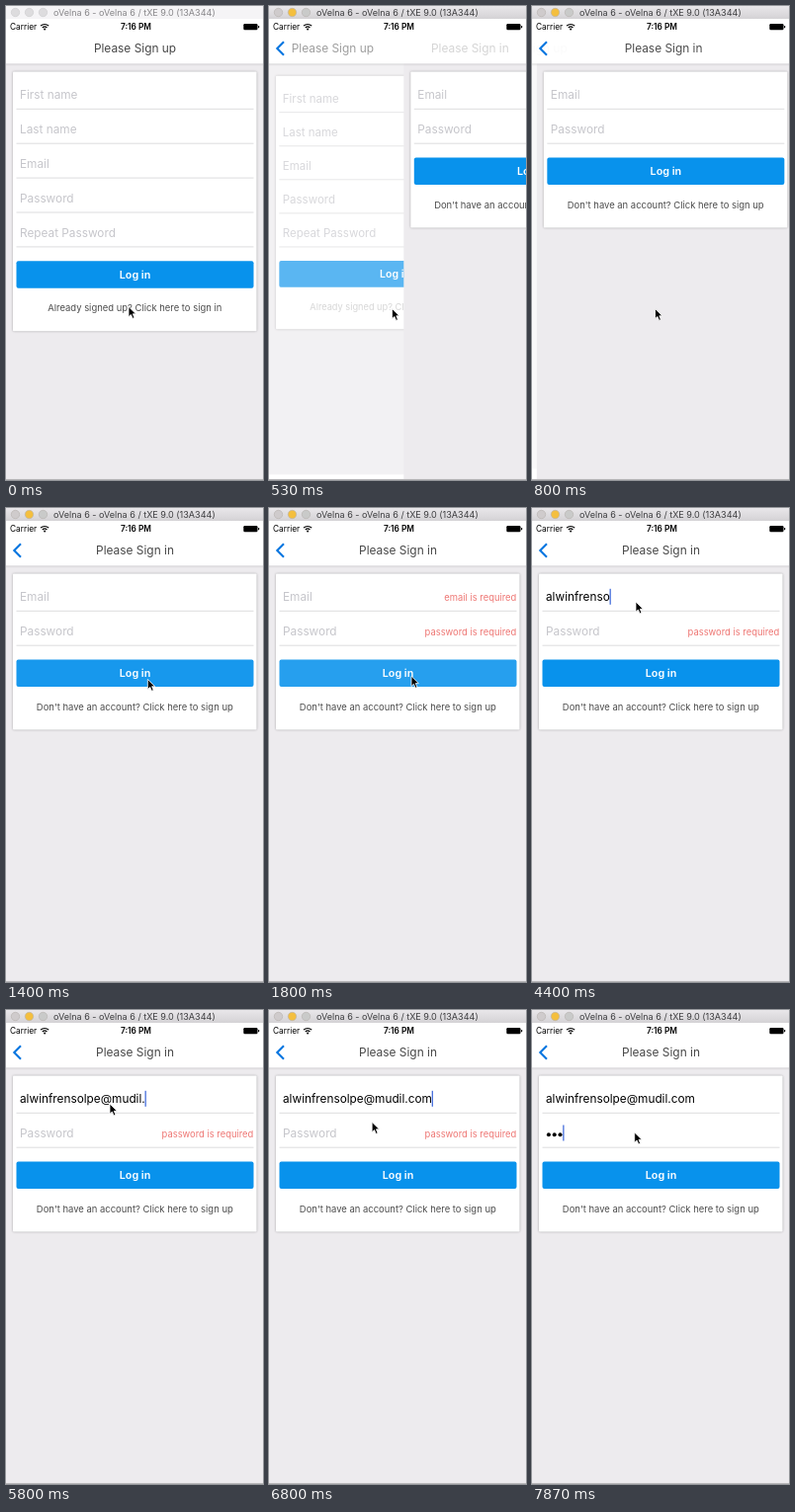
Animation of 260x480 px, one loop 8 s. Source, as an HTML page:

```html
<!DOCTYPE html>
<html lang="en">
<head>
<meta charset="utf-8">
<title>Sign in form</title>
<style>
  html, body { margin: 0; width: 100%; height: 100%; overflow: hidden; background: #fff; }
  svg { display: block; width: 260px; height: 480px; font-family: Inter, Roboto, sans-serif; }
  text { white-space: pre; }
  .mid { text-anchor: middle; }
  .end { text-anchor: end; }
  .field { font-size: 11.8px; }
  .hint { fill: #c6c6cb; }
  .error { font-size: 9.4px; fill: #ee7673; }
  .link { font-size: 9.45px; fill: #4c4c4c; }
  .label { font-size: 10.8px; font-weight: 600; fill: #fff; }
  .title { font-size: 11.9px; fill: #484848; }
  .rule { stroke: #dcdcde; }
  .card { fill: #fff; filter: drop-shadow(0 .8px 1.2px rgba(0, 0, 0, .32)); }
  .bar { fill: #fff; filter: drop-shadow(0 .7px 1px rgba(0, 0, 0, .28)); }
</style>
</head>
<body>
<svg viewBox="0 0 260 480">
  <defs>
    <linearGradient id="chrome" x2="0" y2="1">
      <stop stop-color="#e9e7ea"/><stop offset="1" stop-color="#d4d2d5"/>
    </linearGradient>
  </defs>
  <rect width="260" height="480" fill="#fff"/>
  <g id="signUp"></g>
  <g id="signIn"></g>

  <rect class="bar" x="-4" y="13" width="268" height="45.5"/>
  <path id="back" d="M15 36.3 8.3 43l6.7 6.7" fill="none" stroke="#0b76e0" stroke-width="2.1"/>
  <text id="oldTitle" class="title mid" x="130.5" y="47.2">Please Sign up</text>
  <text id="newTitle" class="title mid" x="130.5" y="47.2">Please Sign in</text>

  <g font-size="8.3">
    <text x="4" y="24">Carrier</text>
    <text class="mid" x="131.5" y="24" font-weight="600">7:16 PM</text>
    <g fill="none" stroke="#000" stroke-width="1.2">
      <path d="M35 20.2a5.8 5.8 0 0 1 8.2 0M36.8 22a3.3 3.3 0 0 1 4.6 0"/>
    </g>
    <circle cx="39.1" cy="23.6" r="1"/>
    <rect x="240.3" y="18" width="14.2" height="6.2" rx="1.2"/>
    <rect x="255" y="19.9" width="1.2" height="2.4" rx=".6"/>
  </g>

  <rect id="chromeBar" width="260" height="13"/>
  <g id="lights" stroke-width=".6">
    <circle cx="9.5" cy="6.5" r="4.2"/>
    <circle cx="23.5" cy="6.5" r="4.2"/>
    <circle cx="37.5" cy="6.5" r="4.2"/>
  </g>
  <text id="caption" x="48" y="9.8" font-size="9.05">oVelna 6 - oVelna 6 / tXE 9.0 (13A344)</text>
  <path d="M0 479.5H260" stroke="#b9b8ba"/>

  <path id="cursor" d="M0 0V10.2L2.4 8 4.1 11.9 5.9 11.1 4.3 7.3H7.4Z" stroke="#fff" stroke-width=".8"/>
</svg>

<script>
const LOOP = 8000;
const PUSH = 427;
const EMAIL = 'alwinfrensolpe@mudil.com';
const EMAIL_KEYS = [2930, 3070, 3270, 3400, 3530, 3670, 3800, 4000, 4200, 4270, 4400, 4470,
  4530, 4670, 4870, 5130, 5270, 5400, 5530, 5600, 5800, 5870, 6000, 6070];
const PASSWORD_KEYS = [7400, 7600, 7800];
const CURSOR = [[0, 124, 304.5], [70, 124, 304.5], [330, 124.5, 306.5], [840, 124.5, 306.5],
  [1310, 143, 175], [1530, 144, 170.3], [1810, 144, 170.3], [2250, 105, 95],
  [6530, 105, 95], [7000, 103.7, 124]];

const $ = id => document.getElementById(id);
const set = (id, attrs) => {
  for (const key in attrs) $(id).setAttribute(key, attrs[key]);
};
const show = (id, on) => set(id, { opacity: on ? 1 : 0 });
const clamp = v => Math.max(0, Math.min(1, v));
const ease = v => v < .5 ? 2 * v * v : 1 - 2 * (1 - v) ** 2;
const between = (t, from, to) => ease(clamp((t - from) / (to - from)));
const typed = (t, keys) => keys.filter(key => key <= t).length;

// One form: background, card, rows, button and link
function form(name, fields, buttonY, link, extra = '') {
  const rows = fields.map((label, i) => `
    <text id="${name}Hint${i}" class="field hint" x="14" y="${94.2 + i * 34.9}">${label}</text>
    <path class="rule" d="M10.5 ${104.3 + i * 34.9}H250.5"/>`).join('');
  $(name).innerHTML = `
    <rect y="13" width="260" height="467" fill="#edebee"/>
    <rect class="card" x="7" y="66.5" width="246.5" height="${buttonY + 4.5}" rx="1"
      style="height:${buttonY + 71 - 66.5}px"/>
    ${rows}
    <g id="${name}Button">
      <rect x="10.5" y="${buttonY}" width="240" height="27.5" rx="2" fill="#0892ec"/>
      <text class="label mid" x="130.5" y="${buttonY + 17.8}">Log in</text>
    </g>
    <text id="${name}Link" class="link mid" x="130.3" y="${buttonY + 51}">${link}</text>${extra}`;
}

form('signUp', ['First name', 'Last name', 'Email', 'Password', 'Repeat Password'], 258.3,
  'Already signed up? Click here to sign in');
form('signIn', ['Email', 'Password'], 153.5, "Don't have an account? Click here to sign up", `
  <text id="emailError" class="error end" x="250.3" y="93.7">email is required</text>
  <text id="passwordError" class="error end" x="250.3" y="128.7">password is required</text>
  <text id="email" class="field" x="14" y="94.2"></text>
  <g id="dots">${[0, 1, 2].map(i => `<circle cx="${16.9 + i * 5.8}" cy="126.2" r="2"/>`).join('')}</g>
  <rect id="caret" width="1.3" height="16" fill="#4870dc"/>`);

// Slightly underdamped spring from 0 to 1
function spring(ms) {
  if (ms <= 0) return 0;
  const s = ms / 1000, w = 4.2;
  return 1 - Math.exp(-13.5 * s) * (Math.cos(w * s) + 12 / w * Math.sin(w * s));
}

// Touch feedback: fade down on press, back up on release
const press = (t, down, up) =>
  1 - .8 * between(t, down, down + 150) * (1 - between(t, up, up + 250));

function cursorAt(t) {
  const i = CURSOR.findIndex(point => point[0] > t);
  if (i < 0) return CURSOR[CURSOR.length - 1].slice(1);
  const [t0, x0, y0] = CURSOR[i - 1], [t1, x1, y1] = CURSOR[i];
  const k = between(t, t0, t1);
  return [x0 + (x1 - x0) * k, y0 + (y1 - y0) * k];
}

function drawWindow(t) {
  const active = t >= 130;
  const fills = active ? ['#cfcbcc', '#f4bf3e', '#c9cac9'] : Array(3).fill('#dddcde');
  set('chromeBar', { fill: active ? 'url(#chrome)' : '#f5f4f6' });
  set('caption', { fill: active ? '#3e3e40' : '#88878a' });
  set('lights', { stroke: active ? '#b5b0ad' : '#cccbcd' });
  [...$('lights').children].forEach((dot, i) => dot.setAttribute('fill', fills[i]));
}

function drawPush(t) {
  const p = spring(t - PUSH);
  const scale = 1 - .05 * p;
  set('signUp', {
    opacity: 1 - .7 * p,
    transform: `translate(${130 - 6.3 * p} 246) scale(${scale}) translate(-130 -246)`
  });
  set('signIn', {
    visibility: p > 0 ? 'visible' : 'hidden',
    transform: `translate(${260 * (1 - p)} 0)`
  });
  set('oldTitle', { opacity: clamp(1 - p), transform: `translate(${-139 * p} 0)` });
  set('newTitle', { opacity: clamp(p * p), transform: `translate(${139 * (1 - p)} 0)` });
  set('back', { opacity: clamp(p * 2.2) });
  set('signUpLink', { opacity: press(t, 200, 460) });
  set('signInButton', { opacity: press(t, 1370, 1620) });
}

function drawTyping(t) {
  const letters = typed(t, EMAIL_KEYS), dots = typed(t, PASSWORD_KEYS);
  const inPassword = t >= 6980;
  $('email').textContent = EMAIL.slice(0, letters);
  [...$('dots').children].forEach((dot, i) => dot.setAttribute('opacity', i < dots ? 1 : 0));
  show('signInHint0', !letters);
  show('signInHint1', !dots);
  show('emailError', t >= 1670 && !letters);
  show('passwordError', t >= 1670 && !dots);
  show('caret', t >= 2270 && !(t >= 2470 && t < 2730));
  const width = inPassword ? dots * 5.8 : letters && $('email').getComputedTextLength();
  set('caret', { x: 13.8 + width, y: inPassword ? 116.5 : 81.8 });
}

let start;
function frame(now) {
  start ??= now;
  const t = (now - start) % LOOP;
  drawWindow(t);
  drawPush(t);
  drawTyping(t);
  set('cursor', { transform: `translate(${cursorAt(t)})` });
  requestAnimationFrame(frame);
}
requestAnimationFrame(frame);
</script>
</body>
</html>
```
